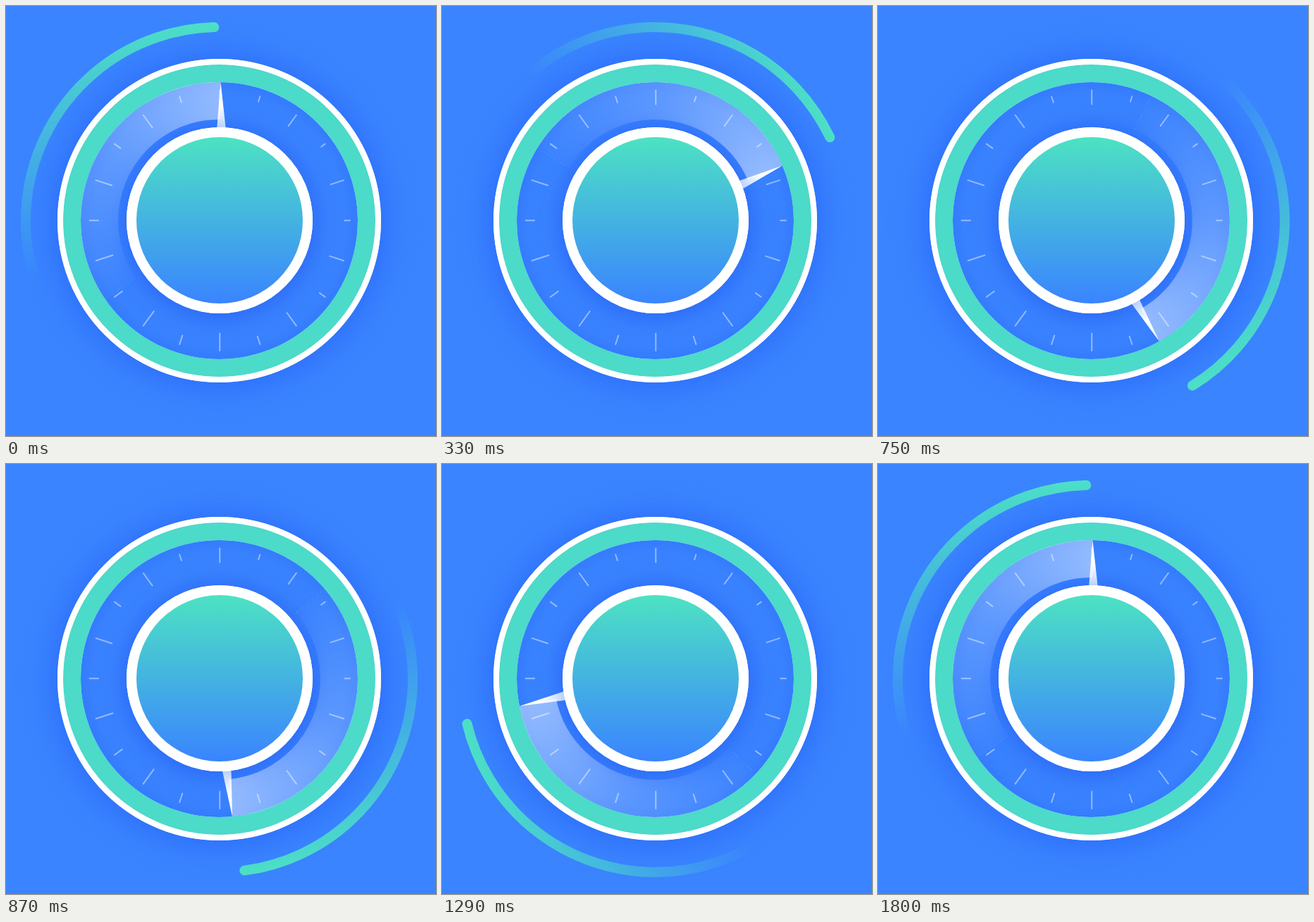
These frames come from a looping animation (610x610 px, 1830 ms). An HTML page with a canvas:

```html
<!DOCTYPE html>
<html>
<head>
<meta charset="utf-8">
<title>Dial</title>
<style>
html, body { margin: 0; width: 100%; height: 100%; overflow: hidden; background: #3a84ff; }
canvas { display: block; }
</style>
</head>
<body>
<canvas id="stage" width="610" height="610"></canvas>
<script>
const ctx = document.getElementById('stage').getContext('2d');
const CX = 302.5, CY = 304.5, RAD = Math.PI / 180;
const BLUE = '#3a84ff', GREEN = '#4cdac9';
const STEP = 30, LOOP = 1830, DEG_PER_STEP = 6;

const white = a => `rgba(255,255,255,${a})`;

function linear(x0, y0, x1, y1, ...stops) {
  const g = ctx.createLinearGradient(x0, y0, x1, y1);
  stops.forEach((c, i) => g.addColorStop(i / (stops.length - 1), c));
  return g;
}

function shadow(blur, color, dy = 0) {
  ctx.shadowBlur = blur;
  ctx.shadowColor = color;
  ctx.shadowOffsetY = dy;
}
const noShadow = () => shadow(0, 'transparent');

function disc(x, y, r, fill) {
  ctx.fillStyle = fill;
  ctx.beginPath();
  ctx.arc(x, y, r, 0, 2 * Math.PI);
  ctx.fill();
}

function arc(r, width, stroke, from = 0, to = 360) {
  ctx.strokeStyle = stroke;
  ctx.lineWidth = width;
  ctx.beginPath();
  ctx.arc(CX, CY, r, from * RAD, to * RAD);
  ctx.stroke();
}

// Runs draw() in a frame turned about the dial centre
function turned(deg, draw) {
  ctx.save();
  ctx.translate(CX, CY);
  ctx.rotate(deg * RAD);
  ctx.translate(-CX, -CY);
  draw();
  ctx.restore();
}

function trail() {
  ctx.lineCap = 'round';
  arc(274.5, 14, linear(0, 25, 0, 388, 'rgb(76,223,198)', 'rgba(76,223,198,0)'), -199, -91.5);
}

function face() {
  shadow(60, 'rgba(37,99,250,.7)', 2);
  disc(CX, CY, 229.5, '#fff');
  noShadow();
  disc(CX, CY, 196.5, BLUE);
  shadow(44, 'rgba(32,88,242,.85)', 3);
  disc(303, 304, 132, '#fff');
  shadow(30, 'rgba(37,99,250,.5)');
  arc(209, 25, GREEN);
  noShadow();
  arc(225.5, 8, '#fff');
}

function glow() {
  const g = ctx.createConicGradient(-214.5 * RAD, CX, CY);
  g.addColorStop(0, white(.015));
  g.addColorStop(.17, white(.18));
  g.addColorStop(125 / 360, white(.45));
  ctx.lineCap = 'butt';
  arc(170, 53, g, -214.5, -89.5);
}

function ticks() {
  ctx.strokeStyle = white(.45);
  ctx.lineWidth = 2;
  ctx.lineCap = 'round';
  ctx.beginPath();
  for (let i = 0; i < 20; i++) {
    const s = Math.sin(i * 18 * RAD), c = Math.cos(i * 18 * RAD);
    const inner = (i % 2 ? 174.5 : 162.5) + 2.3 * (s + c);
    for (const [r, cmd] of [[184.7, 'moveTo'], [inner, 'lineTo']])
      ctx[cmd](303.3 + r * s, 304.2 - r * c);
  }
  ctx.stroke();
}

function needle() {
  ctx.fillStyle = linear(0, 108, 0, 174, '#fff', '#fff', white(.65));
  ctx.beginPath();
  ctx.moveTo(304.5, 108);
  ctx.lineTo(312, 176);
  ctx.lineTo(299, 176);
  ctx.fill();
}

function hub() {
  disc(303, 304, 132, '#fff');
  disc(303, 304, 118, linear(0, 186, 0, 422, '#4de2c3', BLUE));
}

function frame() {
  const angle = Math.floor(performance.now() % LOOP / STEP) * DEG_PER_STEP;
  ctx.fillStyle = BLUE;
  ctx.fillRect(0, 0, 610, 610);
  face();
  turned(angle, () => { trail(); glow(); });
  ticks();
  turned(angle, needle);
  hub();
  requestAnimationFrame(frame);
}
frame();
</script>
</body>
</html>
```
